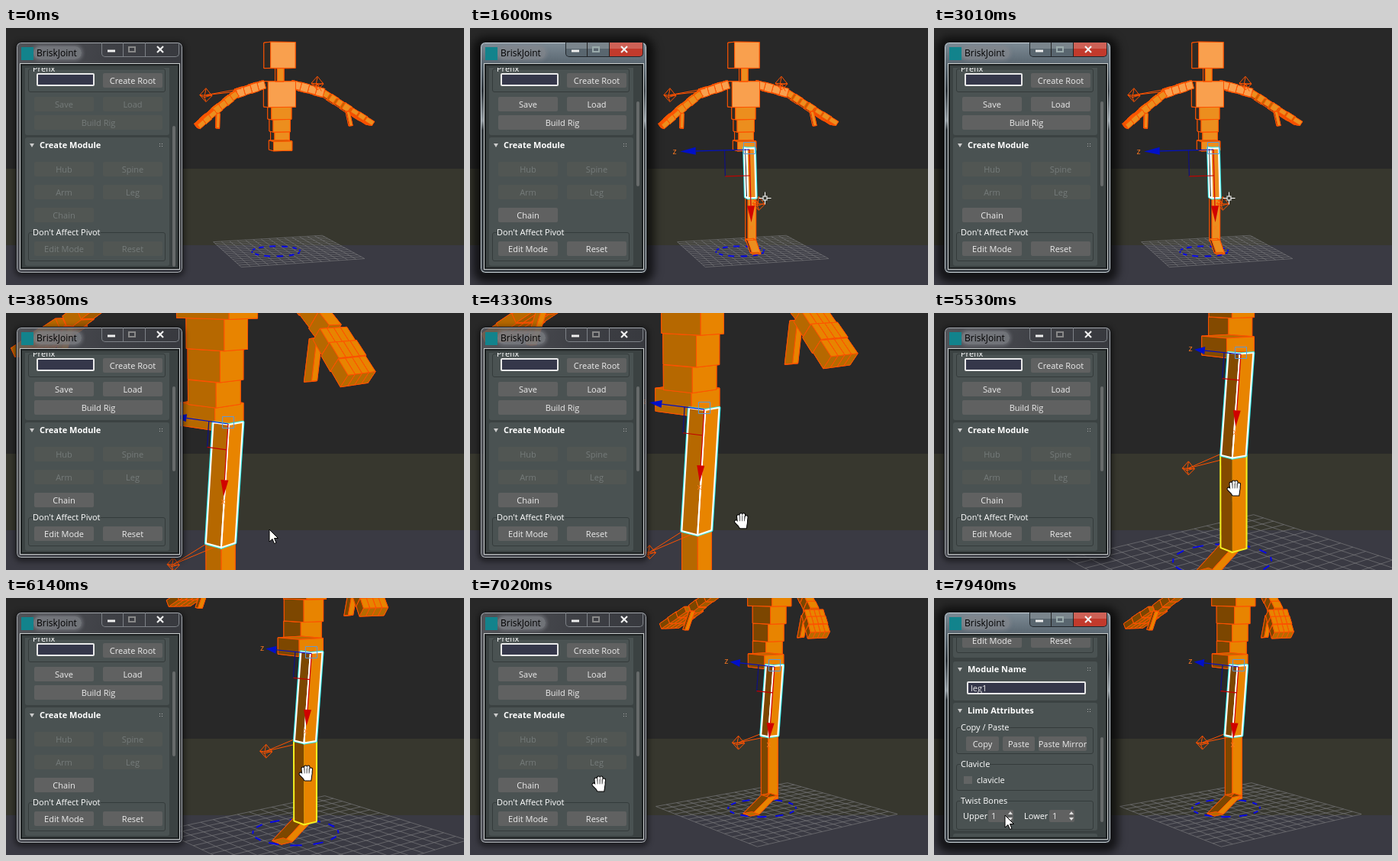
These frames come from a looping animation (600x336 px, 8 s). An HTML page with a canvas:

```html
<!DOCTYPE html>
<html lang="en">
<head>
<meta charset="utf-8">
<title>Leg module</title>
<style>
html, body { margin: 0; width: 100%; height: 100%; overflow: hidden; background: #282828; }
#stage { position: absolute; left: 0; top: 0; width: 600px; height: 336px; overflow: hidden;
  font: 11px "Open Sans", "Noto Sans", sans-serif; color: #ececec; }
#stage div { position: absolute; box-sizing: border-box; white-space: nowrap; }
canvas { position: absolute; left: 0; top: 0; }
#win { left: 13px; top: 18px; width: 219px; height: 303px; border-radius: 7px; border: 1px solid #17181b;
  background: linear-gradient(100deg, #5c5e64d0, #45474ec8 45%, #383a41c0);
  box-shadow: inset 0 0 0 1px #a5a9ae, 0 2px 7px 2px #0007; }
.on #win { background: linear-gradient(#8796a1e8 0, #56646fe8 11%, #2d343be8 21%, #9aa3aaee 34%, #30363bee 38%, #3a4046ee);
  box-shadow: inset 0 0 0 1px #c6d0d6, 0 3px 12px 9px #000a; }
#icon { left: 20px; top: 25px; width: 16px; height: 17px; background: #12838c; }
#title { left: 36px; top: 24px; padding: 0 6px 0 4px; border-radius: 9px; font-size: 12px; line-height: 17px; color: #000;
  background: #85878db0; box-shadow: 0 0 4px 2px #85878d90; }
#caps { left: 125px; top: 19px; width: 102px; height: 19px; border: 1px solid #7d8187; border-top: 0; border-radius: 0 0 5px 5px; overflow: hidden; }
.on #caps { border-color: #20262b; background: linear-gradient(90deg, #59666f 56%, #c23a2c 56%); box-shadow: inset 0 8px 0 #fff3; }
#client { left: 18px; top: 46px; width: 210px; height: 270px; border: 1px solid #c9cdcd; background: #3b4242; box-shadow: inset 0 0 0 2px #1b1f20; }
#view { inset: 0; clip-path: inset(52px 373px 24px 22px); }
#content { inset: 0; }
#thumb { left: 218px; width: 4px; background: #676b6b; border-radius: 2px; }
.roll { background: #4a5252; border-radius: 3px; }
.group { border: 1px solid #343b3b; border-radius: 3px; }
.label { line-height: 16px; background: #4a5252; color: #fff; }
.head { font-weight: bold; line-height: 16px; color: #fff; }
.tri { border: 3px solid transparent; border-top: 5px solid #ccc; border-bottom: 0; }
.grip { background: radial-gradient(#aaa .8px, transparent 1px) 0 0 / 3px 3px; }
.btn { background: #606161; border-radius: 2px; display: flex; align-items: center; justify-content: center; }
.off, .lazy { background: #515653; color: #757b7a; }
.sel .lazy { background: #606161; color: #ececec; }
.input { background: #35374a; border: 2px solid #e9e9e9; border-radius: 2px; line-height: 13px; padding-left: 3px; }
.spin { background: #606161; line-height: 16px; padding-left: 4px; border-radius: 2px; }
.up, .down { width: 6px; border: 3px solid transparent; }
.up { border-bottom: 4px solid #ddd; border-top: 0; }
.down { border-top: 4px solid #ddd; border-bottom: 0; }
.check { background: #626464; }
</style>
</head>
<body>
<div id="stage">
  <canvas id="scene" width="600" height="336"></canvas>
  <div id="win"></div><div id="title">BriskJoint</div><div id="icon"></div><div id="caps"></div>
  <div id="client"></div>
  <div id="view"><div id="content"></div></div>
  <div id="thumb"></div>
  <canvas id="top" width="600" height="336"></canvas>
</div>
<script>
const $ = id => document.getElementById(id);
const g = $('scene').getContext('2d'), o = $('top').getContext('2d');

// ---------- panel ----------
function add(cls, x, y, w, h, text = '') {
  const e = document.createElement('div');
  e.className = cls;
  e.style.cssText = `left:${x}px;top:${y}px;` + (w ? `width:${w}px;` : '') + (h ? `height:${h}px` : '');
  e.textContent = text;
  $('content').append(e);
}
function roll(y, h, title) {
  add('roll', 25, y, 189, h);
  if (!title) return;
  add('tri', 31, y + 8);
  add('head', 44, y + 2, 0, 0, title);
  add('grip', 200, y + 7, 6, 6);
}
function group(y, h, title) {
  add('group', 29, y, 180, h);
  add('label', 35, y - 8, 0, 0, title);
}
const button = (x, y, w, text, cls = '') => add('btn ' + cls, x, y, w, 19, text);
function spinner(x, text) {
  add('label', x, 510, 0, 0, text);
  add('spin', x + 33, 510, 33, 16, '1');
  add('up', x + 59, 512);
  add('down', x + 59, 520);
}
roll(20, 120);
group(53, 31, 'Prefix');
add('input', 40, 59, 76, 17);
button(127, 59, 78, 'Create Root');
button(37, 90, 78, 'Save', 'lazy');
button(127, 90, 78, 'Load', 'lazy');
button(37, 114, 168, 'Build Rig', 'lazy');
roll(143, 168, 'Create Module');
['Hub', 'Spine', 'Arm', 'Leg'].forEach((s, i) => button(37 + i % 2 * 90, 175 + (i >> 1) * 30, 78, s, 'off'));
button(37, 235, 78, 'Chain', 'lazy');
group(267, 38, "Don't Affect Pivot");
button(37, 279, 78, 'Edit Mode', 'lazy');
button(127, 279, 78, 'Reset', 'lazy');
roll(316, 51, 'Module Name');
add('input', 43, 342, 156, 17, 'leg1');
roll(370, 167, 'Limb Attributes');
group(402, 35, 'Copy / Paste');
button(42, 414, 43, 'Copy');
button(90, 414, 42, 'Paste');
button(137, 414, 63, 'Paste Mirror');
group(450, 35, 'Clavicle');
add('check', 39, 466, 11, 10);
add('label', 56, 463, 0, 0, 'clavicle');
group(498, 38, 'Twist Bones');
spinner(38, 'Upper');
spinner(118, 'Lower');
roll(541, 60);

// ---------- timeline ----------
const LOOP = 8000;
const HOME = [366, 157, 1, 17, 5], DEEP = [291, 143, 2.5, -42, 9], LEG = [391, 23, 2.72, -35, 5],
      FOOT = [402, 52, 2.1, -50, 5], BACK = [400, 75, 1.75, -51, 5], REST = [399, 88, 1.43, -52, 5];
// time, then hip x, hip y, zoom, yaw, pitch
const camKeys = [[3070, ...HOME], [3790, ...DEEP], [4150, ...DEEP], [4870, ...LEG], [4990, ...LEG],
  [5530, ...FOOT], [5830, ...FOOT], [6260, ...BACK], [6660, ...BACK], [6840, ...REST]];
const mouseKeys = [[460, 540, 268], [880, 386, 222], [1600, 386, 222], [2330, 452, 285], [2460, 452, 285],
  [2940, 386, 222], [3070, 386, 222], [3790, 345, 283], [4150, 345, 283], [4870, 418, 212], [4990, 418, 212],
  [5530, 394, 229], [6660, 394, 229], [7020, 170, 243], [7220, 170, 243], [7520, 170, 21], [7580, 165, 30], [7940, 93, 284]];

const mix = (a, b, u) => a.map((v, i) => v + (b[i] - v) * u);
function track(keys, t) {
  const i = keys.findIndex(k => k[0] > t);
  if (i < 0) return keys[keys.length - 1].slice(1);
  if (!i) return keys[0].slice(1);
  const a = keys[i - 1], b = keys[i], u = (t - a[0]) / (b[0] - a[0]);
  return mix(a, b, u * u * (3 - 2 * u)).slice(1);
}

// ---------- 3D ----------
let cam;
function setCamera([x, y, s, yaw, pitch]) {
  const r = Math.PI / 180;
  cam = { x, y, s, c: Math.cos(yaw * r), n: Math.sin(yaw * r), pc: Math.cos(pitch * r), ps: Math.sin(pitch * r), d: 1100 / s };
}
function project([x, y, z]) {
  const Z = z * cam.c - x * cam.n, depth = Z * cam.pc - y * cam.ps, k = cam.s * cam.d / (cam.d - depth);
  return [cam.x + (x * cam.c + z * cam.n) * k, cam.y + (y * cam.pc + Z * cam.ps) * k, depth];
}

const CX = -8, body = [], leg = [];
const box = (list, p, q, w, d, pale) => list.push({ p, q, w, d, pale });
function chain(p, q, n, w, d, pale) {
  for (let i = 0; i < n; i++) box(body, mix(p, q, i / n), mix(p, q, (i + 1) / n), w + i % 2, d, pale);
}
// top, bottom, width, depth, forward shift and paleness of each block of the trunk
[[-137, -104, 33, 32, 0, 1], [-104, -87, 9, 10, 0, 0], [-87, -54, 37, 22, 0, 1], [-54, -38, 27, 18, 0, 0],
 [-38, -22, 23, 18, 1, 0], [-22, -9, 20, 19, 2, 0], [-10, 2, 25, 22, 4, 0]]
  .forEach(([a, b, w, d, z, pale]) => box(body, [CX, a, z], [CX, b, z], w, d, pale));
for (const m of [-1, 1]) {
  const P = (x, y, z) => [CX - 2 + m * x, y, z];
  const elbow = P(58, -72, 10), wrist = P(90, -50, 23), tip = P(114, -33, 37);
  chain(P(19, -83, 0), elbow, 4, 10, 9, 1);
  chain(elbow, wrist, 4, 8, 9);
  for (let f = -1.5; f < 2; f++) {
    const off = v => [v[0], v[1], v[2] + f * 5];
    chain(off(wrist), off(tip), 3, 6, 5);
  }
  box(body, P(86, -48, 28), P(88, -30, 34), 4, 4);
}
const knee = [0, 64, 6], ankle = [0, 123, 6];
box(leg, [0, 0, 0], knee, 11, 11);
box(leg, knee, ankle, 11, 11);
box(leg, [0, 120, 6], [0, 134, 27], 11, 10);
const [thigh, shin] = leg;

// Faces from back to front
function faces({ p, q, w, d }) {
  const ax = q[0] - p[0], ay = q[1] - p[1], len = Math.hypot(ax, ay), nx = ay / len, ny = -ax / len;
  const corner = (e, u, v) => {
    const a = e > 0 ? q : p;
    return project([a[0] + nx * w / 2 * u, a[1] + ny * w / 2 * u, a[2] + d / 2 * v]);
  };
  const ring = [[-1, -1], [1, -1], [1, 1], [-1, 1]], list = [];
  for (const s of [-1, 1]) {
    list.push({ tone: s * (nx - ny) > 0 ? 'lit' : 'dark', pts: ring.map(([a, b]) => corner(a, s, b)) });
    list.push({ tone: 'front', pts: ring.map(([a, b]) => corner(a, b, s)) });
    list.push({ tone: 'cap', pts: ring.map(([a, b]) => corner(s, a, b)) });
  }
  for (const f of list) f.z = f.pts.reduce((sum, v) => sum + v[2], 0);
  return list.sort((a, b) => a.z - b.z);
}
function path(c, pts, close) {
  c.beginPath();
  pts.forEach(v => c.lineTo(v[0], v[1]));
  if (close) c.closePath();
}
function line(c, color, width, ...pts) {
  c.strokeStyle = color; c.lineWidth = width;
  path(c, pts); c.stroke();
}
function frontTone(pale) {
  const low = [124, 70, 0], mid = [182, 104, 0], high = pale ? [249, 160, 78] : [236, 142, 30];
  const ramp = (a, b) => Math.min(1, Math.max(0, (cam.c - a) / (b - a)));
  return `rgb(${mix(mix(low, mid, ramp(.63, .74)), high, ramp(.82, .95))})`;
}
const tone = (b, name) => name === 'front' ? frontTone(b.pale)
  : { lit: '#e88400', dark: cam.n > 0 ? '#2f2a24' : '#a05a00', cap: '#b86a00' }[name];
function strokeFace(f, color, width) {
  path(g, f.pts, true);
  g.strokeStyle = color; g.lineWidth = width; g.stroke();
}
function drawBox(b) {
  for (const f of faces(b)) {
    path(g, f.pts, true);
    g.fillStyle = tone(b, f.tone); g.fill();
    strokeFace(f, '#ff5200', 1);
  }
}
function outline(b, rim, inner) {
  const sides = faces(b).slice(3).filter(f => f.tone !== 'cap');
  sides.forEach(f => strokeFace(f, rim, 4));
  for (const f of sides) {
    path(g, f.pts, true);
    g.fillStyle = tone(b, f.tone); g.fill();
  }
  if (inner) sides.forEach(f => strokeFace(f, inner, 2));
}
function pole(p, ...targets) {
  const [x, y] = project(p), r = 8;
  for (const q of targets) line(g, '#ff5200', 1, [x, y], project(q));
  line(g, '#ff5200', 1, [x - r, y], [x, y - r - 1], [x + r, y + 1], [x, y + r + 1], [x - r, y], [x + r, y + 1]);
  line(g, '#ff5200', 1, [x, y - r], [x - 2, y + 3], [x, y + r]);
  line(g, '#ff5200', 1, [x - r, y], [x - 2, y + 3], [x + r, y]);
}
function axis(dir, from, color, label) {
  const L = 98, p = u => [from[0] + dir[0] * u, from[1] + dir[1] * u];
  const [bx, by] = p(L * .75), n = Math.hypot(...dir), sx = -dir[1] / n * 5, sy = dir[0] / n * 5;
  line(g, color, 1.2, p(0), [bx, by]);
  path(g, [[bx + sx, by + sy], p(L * .97), [bx - sx, by - sy]], true);
  g.fillStyle = color; g.fill();
  g.fillStyle = '#ff7a20'; g.font = '11px "Open Sans", sans-serif';
  const [tx, ty] = p(L * 1.04);
  g.fillText(label, tx - 3, ty + 3);
}
function gizmo() {
  const k = project(knee), n = Math.hypot(k[0] - cam.x, k[1] - cam.y);
  const down = [(k[0] - cam.x) / n, (k[1] - cam.y) / n], side = [-cam.c, cam.n * cam.ps];
  const h = [cam.x, cam.y + 2], q = 34;
  const a = [h[0] + side[0] * q, h[1] + side[1] * q], b = [h[0] + down[0] * q, h[1] + down[1] * q];
  const c = [a[0] + down[0] * q, a[1] + down[1] * q];
  line(g, '#101080', 1.2, a, c);
  line(g, '#c00000', 1.2, c, b);
  axis(side, h, '#0010c8', 'z');
  axis(down, h, '#d00000', 'x');
  g.strokeStyle = '#5a9ad8'; g.lineWidth = 1;
  g.strokeRect(Math.round(cam.x) - 7.5, Math.round(cam.y) - 7.5, 15, 15);
}
function drawScene(t) {
  [['#282828', 0], ['#37372e', 184], ['#3a3a43', 284]].forEach(([c, y]) => { g.fillStyle = c; g.fillRect(0, y, 600, 336); });
  setCamera(track(camKeys, t));
  const H = 80, N = 14, floor = 135;
  for (let i = 0; i <= N; i++) {
    const v = -H + 2 * H * i / N;
    line(g, '#77777a', .7, project([v, floor, -H]), project([v, floor, H]));
    line(g, '#77777a', .7, project([-H, floor, v]), project([H, floor, v]));
  }
  const rim = i => project([-14 + 32 * Math.cos(i * .2618), floor, 4 + 32 * Math.sin(i * .2618)]);
  for (let i = 0; i < 24; i += 2) line(g, '#0808e8', 2, rim(i), rim(i + 1));

  const hasLeg = t >= 460;
  g.lineJoin = 'round';
  (hasLeg ? body.concat(leg) : body)
    .map(b => ({ b, z: project(mix(b.p, b.q, .5))[2] }))
    .sort((m, n) => m.z - n.z)
    .forEach(({ b }) => drawBox(b));
  pole([-97, -69, -40], [-68, -74, 5], [-60, -78, 5]);
  pole([58, -84, -40], [48, -74, 5], [40, -78, 5]);
  if (!hasLeg) return;
  pole([0, 67, 41], [0, 60, 8], [0, 65, 8]);
  if (t > 5200 && t < 6660) outline(shin, '#f4f020');
  if (t >= 1140) { outline(thigh, '#30f0f0', '#fff'); gizmo(); }
}

// ---------- cursors and caption glyphs ----------
function arrow(x, y) {
  path(o, [[0, 0], [0, 16], [4, 12.5], [6.5, 18.5], [9, 17.5], [6.5, 11.5], [11.5, 11.5]].map(([a, b]) => [a + x, b + y]), true);
  o.fillStyle = '#fff'; o.strokeStyle = '#000'; o.lineWidth = 1;
  o.fill(); o.stroke();
}
function hand(x, y) {
  o.lineCap = 'round';
  for (const [c, w] of [['#000', 5], ['#fff', 3]]) {
    [[-5, -6], [-1.5, -8], [2, -8], [5.5, -5]].forEach(([dx, dy]) => line(o, c, w, [x + dx, y + dy], [x + dx * .8, y + 4]));
    line(o, c, w, [x - 8, y + 1], [x - 3, y + 6], [x + 4, y + 6]);
    line(o, c, w, [x - 2, y + 8], [x + 4, y + 8], [x + 5, y]);
  }
  o.fillStyle = '#fff'; o.fillRect(x - 4, y, 9, 8);
  for (const dx of [-3, 0, 3]) line(o, '#333', .7, [x + dx, y - 6], [x + dx, y]);
}
function cross(x, y) {
  for (const s of [-1, 1]) {
    line(o, '#fff', 1, [x + 8 * s, y], [x + 2 * s, y]);
    line(o, '#fff', 1, [x, y + 8 * s], [x, y + 2 * s]);
  }
  o.strokeRect(x - 2.5, y - 2.5, 5, 5);
}
function drawTop(t, x, y, on) {
  o.clearRect(0, 0, 600, 336);
  o.lineCap = 'butt';
  line(o, '#eee', 3, [133, 30], [143, 30]);
  o.strokeStyle = on ? '#9aa' : '#888'; o.lineWidth = 2; o.strokeRect(161, 25, 8, 6);
  for (const s of [-1, 1]) line(o, '#f2f2f2', 2.2, [202 - 4 * s, 24], [202 + 4 * s, 32]);
  for (const edge of [153.5, 182.5]) line(o, on ? '#222' : '#7d8187', 1, [edge, 19], [edge, 37]);
  if (t < 460) return;
  if (t < 3200 && x < 390) cross(Math.round(x) + .5, Math.round(y) + .5);
  else if (t >= 4150 && t < 7540) hand(x, y);
  else arrow(x, y);
}

function frame(now) {
  const t = now % LOOP;
  const [x, y] = track(mouseKeys, t);
  const on = t >= 1140 && t < 1960 || t >= 2820 && t < 3370 || t >= 7220;
  const picked = t >= 1140;
  const scroll = t < 7220 ? 0 : t >= 7520 ? 233 : (243 - y) * 233 / 222;
  $('stage').className = (on ? 'on ' : '') + (picked ? 'sel' : '');
  $('content').style.transform = `translateY(${-Math.round(scroll)}px)`;
  $('thumb').style.top = (picked ? 96 + scroll * .37 : 128) + 'px';
  $('thumb').style.height = (picked ? 111 : 184) + 'px';
  drawScene(t);
  drawTop(t, x, y, on);
  requestAnimationFrame(frame);
}
requestAnimationFrame(frame);
</script>
</body>
</html>
```
